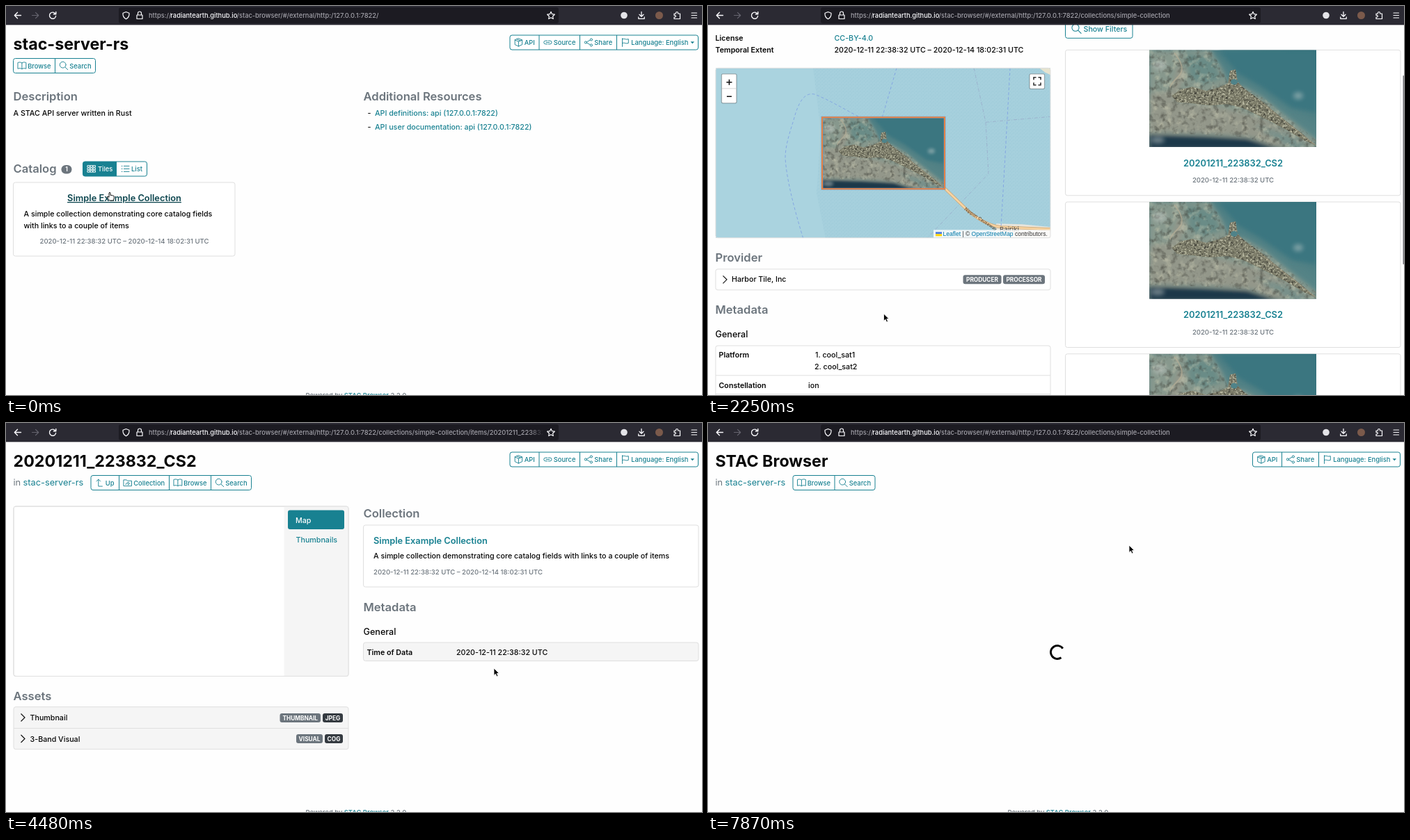
Animation of 1000x560 px, one loop 8000 ms. Source, as an HTML page:

```html
<!DOCTYPE html>
<html lang="en">
<head>
<meta charset="utf-8">
<title>Catalog browser</title>
<style>
html, body { margin: 0; width: 100%; height: 100%; overflow: hidden; background: #fefefe; }
svg { display: block; }
#stage { width: 100vw; height: 100vh; }
text { font: 450 10.7px Inter, "Open Sans", sans-serif; fill: #060606; white-space: pre; }
.h1 { font-size: 23.25px; font-weight: 700; }
.h2 { font-size: 16.6px; font-weight: 600; fill: #6c757d; }
.lead { font-size: 12.8px; font-weight: 400; }
.title { font-size: 12.8px; font-weight: 600; }
.general { font-size: 12.6px; font-weight: 500; }
.bold { font-weight: 600; }
.btn { font-size: 9.4px; }
.small { font-size: 9.55px; }
.url { font-size: 9.3px; fill: #a3a2aa; }
.badge { font-size: 8.3px; font-weight: 700; }
.teal { fill: #188191; }
.muted { fill: #6c757d; }
.white { fill: #fff; }
.mid { text-anchor: middle; }
.credit { font: 8.5px "Liberation Sans", Arial, sans-serif; fill: #333; }
.credit .link { fill: #0078a8; }
.hover { fill: #0d464f; text-decoration: underline; }
.icon { fill: none; stroke: #188191; stroke-width: 1.15; stroke-linejoin: round; stroke-linecap: round; }
.tool { fill: none; stroke: #fbfbfe; stroke-width: 1.2; stroke-linejoin: round; stroke-linecap: round; }
</style>
</head>
<body>
<svg id="stage" viewBox="0 0 1000 560" preserveAspectRatio="none"></svg>
<script>
const TEAL = '#188191', GREY = '#6c757d', LINE = '#dfdfdf';
const LOOP = 8000;

const text = (x, y, s, cls = '', attrs = '') =>
  `<text x="${x}" y="${y}" class="${cls}" ${attrs}>${s}</text>`;
const box = (x, y, w, h, fill = '#fff', stroke = LINE, r = 3, attrs = '') =>
  `<rect x="${x}" y="${y}" width="${w}" height="${h}" rx="${r}" fill="${fill}" stroke="${stroke}" ${attrs}/>`;
const path = (d, attrs = '') => `<path d="${d}" ${attrs}/>`;
const group = (id, body, attrs = '') => `<g id="${id}" ${attrs}>${body}</g>`;

const ICONS = {
  box: 'M8 1L14.5 3.7V12L8 15L1.5 12V3.7ZM1.5 3.7L8 6.5L14.5 3.7M8 6.5V15M5 2.3L11.3 5',
  link: 'M7 5H4a3 3 0 0 0 0 6h3M9 5h3a3 3 0 0 1 0 6H9M5 8h6',
  share: 'M15 3a2 2 0 1 0-4 0a2 2 0 1 0 4 0M5 8a2 2 0 1 0-4 0a2 2 0 1 0 4 0M15 13a2 2 0 1 0-4 0a2 2 0 1 0 4 0M5 7l6-3M5 9l6 3',
  flag: 'M2.5 15.5V.8M2.5 2c4-2 6 2 11 0v7.3c-5 2-7-2-11 0',
  book: 'M8 3c-2-1.5-5-1.5-7.4-.5v11c2.4-1 5.4-1 7.4.5c2-1.5 5-1.5 7.4-.5v-11c-2.4-1-5.4-1-7.4.5v11',
  search: 'M12 6.5a5.5 5.5 0 1 0-11 0a5.5 5.5 0 1 0 11 0M10.5 10.5L15.3 15.3',
  up: 'M13 14.5H6V2M2.5 5.5L6 2L9.5 5.5',
  folder: 'M1 3h5l1.5 1.7H15V14H1zM4.5 11.5c0-2 1.5-3 4-3V7l3 2.5l-3 2.5v-1.6',
  tiles: [1, 6, 11].map(x => [2, 6.5, 11].map(y => `M${x} ${y}h4v3h-4z`).join('')).join(''),
  list: 'M5.5 3H15M5.5 8H15M5.5 13H15M1.5 3h1M1.5 8h1M1.5 13h1'
};
const icon = (name, x, y, k = .8, attrs = '') =>
  `<g transform="translate(${x} ${y}) scale(${k})">${path(ICONS[name], `class="icon" ${attrs}`)}</g>`;

// A row of joined buttons; items are [width, icon, label].
function buttons(x, y, items) {
  const total = items.reduce((sum, it) => sum + it[0], 0);
  let out = box(x, y, total, 21, '#fff', TEAL);
  items.forEach(([w, name, label], i) => {
    if (i) out += path(`M${x} ${y}v21`, `stroke="${TEAL}"`);
    out += icon(name, x + 6, y + 4) + text(x + 20.7, y + 14.2, label, 'btn teal');
    x += w;
  });
  return out;
}

const API = [42, 'box', 'API'], SOURCE = [58.5, 'link', 'Source'];
const SHARE = [53, 'share', 'Share'], LANG = [117, 'flag', 'Language: English'];
const UP = [40.5, 'up', 'Up'], COLL = [72, 'folder', 'Collection'];
const BROWSE = [60, 'book', 'Browse'], SEARCH = [58, 'search', 'Search'];

function header(title, items, parent = true, source = true) {
  const top = source ? [API, SOURCE, SHARE, LANG] : [API, SHARE, LANG];
  return text(10.5, 63, title, 'h1') +
    buttons(source ? 724 : 782.5, 42, top) +
    path('M983.5 51.3h5.5l-2.75 3z', `fill="${TEAL}"`) +
    (parent ? text(10.5, 90, 'in', 'lead muted') + text(24.5, 90, 'stac-server-rs', 'lead teal') : '') +
    buttons(parent ? 122 : 10.5, 75.5, items);
}

const footer = text(430.5, 564, 'Powered by <tspan class="teal">STAC Browser</tspan> 3.2.0', 'btn muted');
const chevron = y => path(`M21.5 ${y - 5.5}l5.5 5.5l-5.5 5.5`, 'fill="none" stroke="#111" stroke-width="1.2"');
const badge = (x, y, w, label, fill = GREY) =>
  box(x, y, w, 13, fill, 'none') + text(x + w / 2, y + 9.6, label, 'badge white mid');
const DATES = '2020-12-11 22:38:32 UTC – 2020-12-14 18:02:31 UTC';
const ABOUT = 'A simple collection demonstrating core catalog fields with links to a couple of items';

// Noise of one tone, kept inside the shape it is applied to.
const grain = (id, tone, freq, seed, gain) =>
  `<filter id="${id}" x="0" y="0" width="1" height="1" color-interpolation-filters="sRGB">
    <feTurbulence type="fractalNoise" baseFrequency="${freq}" numOctaves="3" seed="${seed}"/>
    <feColorMatrix values="0 0 0 0 ${tone} 0 0 0 0 ${tone} 0 0 0 0 ${tone * .88} ${gain} 0 0 0 ${-gain * .5}"/>
    <feComposite in2="SourceGraphic" operator="in"/></filter>`;

const LAND = 'M32 66L45 57L62 53L82 59L100 54L113 48L116 30L124 28L127 46L137 56L162 74L188 96L215 117L240 138L222 130L195 114L162 97L135 84L112 78L88 80L62 77L40 75Z';
const REEF = 'M0 0H88L104 26L114 50L136 53L164 69L192 92L240 130V140H180L140 126L80 122L0 120Z';

function photoDef() {
  return `<linearGradient id="sea" x1="0" y1="1" x2="1" y2="0">
    <stop offset="0" stop-color="#84958d"/><stop offset=".5" stop-color="#5d8889"/><stop offset="1" stop-color="#2f6c78"/></linearGradient>
  <filter id="soft" x="-5%" y="-5%" width="110%" height="110%"><feGaussianBlur stdDeviation="3"/></filter>
  ${grain('light', .8, .09, 4, 3)}${grain('dark', .22, .12, 9, 3)}${grain('roofs', .82, .35, 2, 4)}${grain('trees', .2, .28, 6, 4)}
  <symbol id="photo" viewBox="0 0 240 140" preserveAspectRatio="none">
    <rect width="240" height="140" fill="url(#sea)"/>
    <g filter="url(#soft)">
      ${path('M100 0H240V90L205 84L160 52L128 34Z', 'fill="#3a7680"')}
      ${path(REEF, 'fill="#87988d"')}
      ${path('M0 62L30 60L42 20L52 34L36 74L100 82L165 99L240 142H190L150 127L80 121L0 118Z', 'fill="#93978a"')}
      ${path('M52 4L92 12L104 42L76 50L58 40Z', 'fill="#6a8c87"')}
      ${path('M0 122L80 125L140 128L190 143H0Z', 'fill="#1e384a"')}
      ${path('M150 108L200 122L240 144H205Z', 'fill="#78908a"')}
    </g>
    <g opacity=".5">${path(REEF, 'filter="url(#light)"')}${path(REEF, 'filter="url(#dark)"')}</g>
    ${path('M36 4Q54 26 42 38T30 54', 'fill="none" stroke="#b5ae97" stroke-width="2" opacity=".7"')}
    ${path(LAND, 'fill="#7c7c69"')}
    <g opacity=".75">${path(LAND, 'filter="url(#trees)"')}${path(LAND, 'filter="url(#roofs)"')}</g>
    <ellipse cx="122" cy="46" rx="5" ry="4" fill="#4f8389"/>
    ${path('M160 76L240 138', 'stroke="#b3ab92" opacity=".7"')}
    <g filter="url(#soft)" fill="#d0d6d2" opacity=".45"><ellipse cx="12" cy="130" rx="10" ry="5"/><ellipse cx="214" cy="66" rx="7" ry="5"/><ellipse cx="15" cy="22" rx="10" ry="7"/></g>
  </symbol>
  <pattern id="dots" width="5" height="5" patternUnits="userSpaceOnUse">
    <rect width="5" height="5" fill="#a6d0dd"/><path d="M0 1h1M3 3.5h1M1.5 4.4h.7" stroke="#93c3d2" stroke-width=".7"/></pattern>`;
}

const photo = (x, y, w, h, attrs = '') => `<use href="#photo" x="${x}" y="${y}" width="${w}" height="${h}" ${attrs}/>`;
const footprint = (stroke, width, attrs = '') => box(153, 71, 176, 103, 'none', stroke, 0, `stroke-width="${width}" ${attrs}`);
const scene = attrs => photo(153, 71, 176, 103, attrs);

// Map panel; the terrain is shifted by dx inside a window of width w.
function mapPanel(y, w, dx, overlay) {
  const dash = 'fill="none" stroke="#80a2e2" stroke-width=".9" stroke-dasharray="4 3"';
  const border = 'fill="none" stroke="#98abc9" stroke-width=".8" stroke-dasharray="5 2 1 2"';
  const road = 'M329 173L362 205Q386 226 410 229L481 232';
  const ctl = 'rgba(0,0,0,.28)', cx = w - 30;
  return `<svg x="11" y="${y}" width="${w}" height="244.5">
    <rect width="${w}" height="245" fill="#aad3df"/>
    <g transform="translate(${dx} 0)">
      ${path('M140 0H481V246H158L145 180L151 90Z', 'fill="url(#dots)"')}
      ${path('M465 0H481V10L473 6Z', 'fill="#e6e3cf"')}
      ${path('M403 224L440 225L481 229V245H403Z', 'fill="#e9e5db"')}
      ${path('M260 0L239 72M211 73C190 62 165 47 143 38C128 34 119 48 112 75C104 100 100 115 100 130C102 160 112 200 126 246M423 0L416 126L409 246', dash)}
      ${path('M371 0L388 78L481 70M388 78L392 152L303 246', border)}
      ${path(road, 'fill="none" stroke="#c9a26c" stroke-width="4"')}
      ${path(road, 'fill="none" stroke="#f7d3a2" stroke-width="2.8"')}
      <text transform="translate(357 204) rotate(34)" style="font-size:6.3px;fill:#5b4630">Nippon Causeway</text>
      ${text(408, 235.5, 'Bairiki', '', 'style="font-size:9.5px;fill:#555"')}
      ${overlay}
    </g>
    ${box(8.5, 8.5, 21.5, 42, '#fff', ctl, 2, 'stroke-width="1.3"')}${path('M9 29.5h20.5', 'stroke="#ccc" stroke-width=".8"')}
    ${path('M15.5 20.5h8M19.5 16.5v8M16 41h7', 'stroke="#111" stroke-width="1.6"')}
    ${box(cx, 8.5, 21.5, 21.5, '#fff', ctl, 2, 'stroke-width="1.3"')}
    ${path(`M${cx + 6} 17v-3.5h3.5m3 0h3.5v3.5m0 4v3.5h-3.5m-3 0h-3.5v-3.5`, 'fill="none" stroke="#333" stroke-width="1.6"')}
    <g transform="translate(${w - 481} 0)">
      <rect x="313" y="233" width="168" height="12" fill="#fff" opacity=".82"/>
      <rect x="316" y="236" width="9" height="3" fill="#4c7be1"/><rect x="316" y="239" width="9" height="3" fill="#ffd500"/>
      ${text(326.5, 241.7, '<tspan class="link">Leaflet</tspan> | © <tspan class="link">OpenStreetMap</tspan> contributors.', 'credit')}
    </g></svg>`;
}

const home = header('stac-server-rs', [BROWSE, SEARCH], false) +
  text(10.5, 136, 'Description', 'h2') + text(10.5, 158, 'A STAC API server written in Rust') +
  text(513.5, 136, 'Additional Resources', 'h2') +
  ['API definitions', 'API user documentation'].map((s, i) =>
    text(519.5, 158 + i * 19.5, '-') + text(530, 158 + i * 19.5, `${s}: api (127.0.0.1:7822)`, 'teal')).join('') +
  text(10.5, 240, 'Catalog', 'h2') + box(79.5, 229, 15, 12.5, GREY, 'none', 6.2) + text(87, 238.3, '1', 'badge white mid') +
  box(110.5, 224, 92, 21, '#fff', TEAL) + path('M113 224H159V245H113Q110.5 245 110.5 242V227Q110.5 224 113 224', `fill="${TEAL}"`) +
  icon('tiles', 116.5, 228, .8, 'style="stroke:#fff"') + text(132, 238.3, 'Tiles', 'btn white') +
  icon('list', 165, 228) + text(180, 238.3, 'List', 'btn teal') +
  box(10.5, 254, 318.5, 106) + text(170, 281, 'Simple Example Collection', 'title mid hover') +
  text(25.5, 303, 'A simple collection demonstrating core catalog fields') + text(25.5, 319.5, 'with links to a couple of items') +
  text(170, 342, DATES, 'small muted mid') + footer;

const card = i => {
  const y = 198 + i * 218.75;
  return box(513.5, y, 481.5, 209.5) +
    text(754.5, y + 167.3, '20201211_223832_CS2', 'title teal mid', i ? '' : 'id="cardTitle"') +
    text(754.5, y + 191, '2020-12-11 22:38:32 UTC', 'small muted mid');
};

const coll = header('Simple Example Collection', [UP, BROWSE, SEARCH]) +
  text(10.5, 136, 'Description', 'h2') + text(10.5, 158, ABOUT) +
  text(10.5, 185, 'License', 'bold') + text(181.5, 185, 'CC-BY-4.0', 'teal') +
  text(10.5, 202, 'Temporal Extent', 'bold') + text(181.5, 202, DATES) +
  group('collMap', mapPanel(224, 481, 0,
    scene() + footprint('#5e93cf', 3, 'opacity=".7"') + footprint('#ee823f', 1.9))) +
  box(11, 224, 481, 244.5, 'none') +
  text(10.5, 502.7, 'Provider', 'h2') + box(11, 513.5, 481, 30) + chevron(528.5) + text(34, 532, 'Harbor Tile, Inc') +
  badge(366.5, 522, 55, 'PRODUCER') + badge(424, 522, 60, 'PROCESSOR') +
  text(10.5, 577.7, 'Metadata', 'h2') + text(10.5, 611.7, 'General', 'general') +
  box(11, 623.7, 481, 140) + path('M11 666.5H492M11 693.3H492', `stroke="${LINE}"`) +
  text(15.5, 641, 'Platform', 'bold') + text(154, 641, '1. cool_sat1') + text(153, 657.7, '2. cool_sat2') +
  text(15.5, 684.3, 'Constellation', 'bold') + text(144, 684.3, 'ion') +
  text(513.5, 136, 'Items', 'h2') + box(513.5, 154.5, 96.5, 26.5, '#fff', TEAL) +
  icon('search', 522, 160, .92) + text(539.5, 171.8, 'Show Filters', 'teal') +
  [0, 1, 2].map(card).join('') +
  group('thumbs', [0, 1, 2].map(i => photo(634, 198 + i * 218.75, 240, 139.7)).join(''));

const item = header('20201211_223832_CS2', [UP, COLL, BROWSE, SEARCH]) +
  box(11, 120, 481, 244.5) + path('M399.5 120H492V364.5H399.5Z', 'fill="#f5f5f5"') +
  group('itemMap', mapPanel(120, 388.5, -46,
    group('overlay', scene('opacity=".92"') + footprint('#3b84f2', 2)))) +
  box(11, 120, 481, 244.5, 'none') +
  box(405, 125.5, 81, 27.5, TEAL, 'none') + text(416, 143.5, 'Map', 'white') + text(416.5, 171.5, 'Thumbnails', 'teal') +
  text(10.5, 399, 'Assets', 'h2') + box(11, 408.7, 481, 61, '#f5f5f5', LINE, 3, 'id="assets"') +
  path('M11 439.5H492', `stroke="${LINE}"`) +
  chevron(424) + text(34.5, 428, 'Thumbnail') + badge(393.5, 418, 58.5, 'THUMBNAIL') + badge(455, 418, 29, 'JPEG', '#343a40') +
  chevron(454.5) + text(34.5, 458.6, '3-Band Visual') + badge(417, 448, 38, 'VISUAL') + badge(458, 448, 26, 'COG', '#343a40') +
  group('shown', box(361.5, 447, 52.5, 15, '#28a745', 'none') +
    path('M366.5 454.5l2.3 2.5l4.2-5', 'fill="none" stroke="#fff" stroke-width="1.2"') + text(376.5, 457.7, 'SHOWN', 'badge white')) +
  text(513.5, 136, 'Collection', 'h2') + box(513.5, 147, 481.5, 89) +
  text(528, 174, 'Simple Example Collection', 'title teal', 'id="collTitle"') + text(528, 195, ABOUT) + text(528, 217.5, DATES, 'small muted') +
  text(513.5, 270.5, 'Metadata', 'h2') + text(513.5, 304.5, 'General', 'general') +
  box(513.5, 316, 481.5, 26.5, '#f5f5f5') + text(518.5, 333.5, 'Time of Data', 'bold') + text(647, 333.5, '2020-12-11 22:38:32 UTC') + footer;

const load = header('STAC Browser', [BROWSE, SEARCH], true, false) +
  group('spinner', path('M6.7 6.7A9.5 9.5 0 1 1 6.7 -6.7', 'fill="none" stroke="#000" stroke-width="2.9"')) + footer;

const toolbar = `<rect width="1000" height="27.3" fill="#2b2a33"/>` + box(162, 2, 632, 23, '#1c1b22', 'none') +
  `<g class="tool">${path('M21.5 13.5H12.5M16.5 9.3L12.3 13.5L16.5 17.7', 'stroke-width="1.4"')}
  ${path('M37.5 13.5H46.5M42.5 9.3L46.7 13.5L42.5 17.7', 'stroke="#65646e"')}
  ${path('M70.8 11A4.6 4.6 0 1 0 71.6 14.5M71.8 8.5V11.8H68.5', 'stroke-width="1.4"')}
  ${path('M172.5 8.5L177 10.2Q177.5 16 172.5 18.8Q167.5 16 168 10.2Z')}
  ${path('M188 13h8v5.5h-8zM189.5 13v-2.5a2.5 2.5 0 0 1 5 0V13')}
  ${path('M783 8.3l1.6 3.4l3.7.5l-2.7 2.6l.7 3.7l-3.3-1.8l-3.3 1.8l.7-3.7l-2.7-2.6l3.7-.5z')}
  ${path('M913 8.5v6.5M910 12.2l3 3l3-3M908.8 16v2.3h8.4V16', 'stroke-width="1.3"')}
  ${path('M960 11h2.5v-1a1.5 1.5 0 0 1 3 0v1h3v7.5h-8.5v-2.5h1a1.3 1.3 0 0 0 0-2.6h-1z')}
  ${path('M985 10h7.5M985 13.5h7.5M985 17h7.5')}</g>
  <circle cx="888" cy="13.5" r="4.8" fill="#e4e4e8"/><circle cx="938.5" cy="13.5" r="5.5" fill="#7b5a4b"/>` +
  text(205, 17, 'https://', 'url') + text(236.3, 17, 'radiantearth.github.io', 'url', 'style="fill:#fbfbfe"') +
  `<svg x="331.5" width="440" height="27"><text id="path" x="0" y="17" class="url"></text></svg>
  <rect x="752" y="4" width="20" height="19" fill="url(#fade)"/>`;

const arrow = path('M0 0V10.4L2.4 8.2L4.1 12L6 11.2L4.3 7.5H7.5Z', 'fill="#000" stroke="#fff" stroke-width=".8"');
const pointer = path('M-1 1Q0-.5 1 1V4.5Q2 3.6 3 4.8Q4 4 4.8 5.2Q6 4.7 6.2 6V9Q5.5 11 5 12H-.5Q-1.5 10.5-2 9.5L-4 7Q-3.5 5.5-1 7.3Z', 'fill="#fff" stroke="#000" stroke-width=".9" stroke-linejoin="round"');
const grab = path('M-3.6-2.5Q-3-4.3-1.7-3.6Q-.8-5.3.4-4.1Q1.8-5 2.4-3.2Q4.3-3.6 4.3-1.5V1.5Q4 4 3 5.5H-2.3Q-3 3.5-4.8 1.5Q-5.3-.3-3.3.3Z', 'fill="#fff" stroke="#000" stroke-width="1" stroke-linejoin="round"') +
  path('M-1.5-3V0M.5-3.5V0M2.4-3V0', 'stroke="#000" stroke-width=".7"');

document.getElementById('stage').innerHTML = `<defs>${photoDef()}
  <linearGradient id="fade"><stop offset="0" stop-color="#1c1b22" stop-opacity="0"/><stop offset="1" stop-color="#1c1b22"/></linearGradient></defs>
  <rect width="1000" height="560" fill="#fefefe"/>` +
  group('home', home) + group('coll', coll) + group('item', item) + group('load', load) +
  `<rect id="bar" x="998.5" width="1.5" height="272" rx=".7" fill="#77777c"/>` + toolbar +
  group('a', arrow) + group('p', pointer) + group('g', grab);

const $ = id => document.getElementById(id);
const show = (id, on) => $(id).style.display = on ? '' : 'none';
const at = (steps, t) => steps.filter(s => s[0] <= t).pop();

const PAGES = [[0, 'home'], [180, 'load'], [470, 'coll'], [4330, 'load'], [4480, 'item'], [7870, 'load']];
const BASE = '/stac-browser/#/external/http:/127.0.0.1:7822/', ONE = BASE + 'collections/simple-collection';
const PATHS = [[0, BASE], [180, ONE], [4330, ONE + '/items/20201211_223832_CS2'], [7870, ONE]];
const SCROLL = [[0, 0], [1950, 15], [2100, 80], [2250, 134.7], [2400, 168], [2540, 182],
  [2990, 60], [3140, 8], [3280, -1.8], [3430, 0]];
const BAR = [[0, 1], [1060, .7], [1210, .4], [1360, 0], [1950, 1], [3580, .5], [3730, 0]];
// Time, x, y and shape: arrow, pointer or grabbing hand.
const CURSOR = [[0, 149, 268, 'p'], [180, 149, 268, 'a'], [620, 149, 268, 'g'],
  [1060, 160, 290, 'g'], [1210, 190, 340, 'g'], [1360, 220, 390, 'g'], [1500, 245, 430, 'g'], [1650, 252.5, 443, 'g'],
  [2100, 252.5, 443, 'a'], [3140, 252.5, 443, 'g'],
  [3580, 330, 425, 'g'], [3730, 520, 395, 'a'], [3880, 640, 368, 'a'], [4030, 701, 353, 'p'], [4330, 701, 353, 'a'],
  [5370, 680, 300, 'a'], [5520, 620, 175, 'p'], [5670, 500, 220, 'a'], [5820, 390, 330, 'g'], [5970, 430, 434, 'a'],
  [6100, 450, 340, 'a'], [6250, 465, 238, 'a'], [6400, 495, 290, 'a'], [6550, 519, 320, 'a'],
  [6690, 545, 305, 'a'], [6840, 552, 282, 'a'], [7140, 570, 230, 'a'], [7290, 592, 175, 'p'], [7430, 605, 176, 'p'], [7870, 605, 176, 'a']];

function render(t) {
  const page = at(PAGES, t)[1], scroll = at(SCROLL, t)[1];
  ['home', 'coll', 'item', 'load'].forEach(id => show(id, id === page));
  $('coll').setAttribute('transform', `translate(0 ${-scroll})`);
  show('collMap', t >= 620);
  show('thumbs', t >= 620);
  show('itemMap', t >= 4780);
  show('overlay', t >= 5070);
  show('shown', t >= 4930);
  $('assets').setAttribute('height', t >= 4930 ? 62 : 61);

  $('bar').setAttribute('y', 28 + Math.max(0, scroll) * .535);
  $('bar').setAttribute('opacity', page === 'coll' ? at(BAR, t)[1] : 0);
  $('path').textContent = at(PATHS, t)[1];

  const tick = 180 + Math.floor((t - 180) / 147.8) * 147.8;
  const turn = (tick - 7865.6) * 360 / 750 + 10;
  $('spinner').setAttribute('transform', `translate(502 330) rotate(${turn})`);

  const [, x, y, kind] = at(CURSOR, t);
  ['a', 'p', 'g'].forEach(id => show(id, id === kind));
  $(kind).setAttribute('transform', `translate(${x} ${y})`);
  ['cardTitle', 'collTitle'].forEach(id => $(id).classList.toggle('hover', kind === 'p'));
}

const start = performance.now();
function frame() {
  render((performance.now() - start) % LOOP);
  requestAnimationFrame(frame);
}
frame();
</script>
</body>
</html>
```
